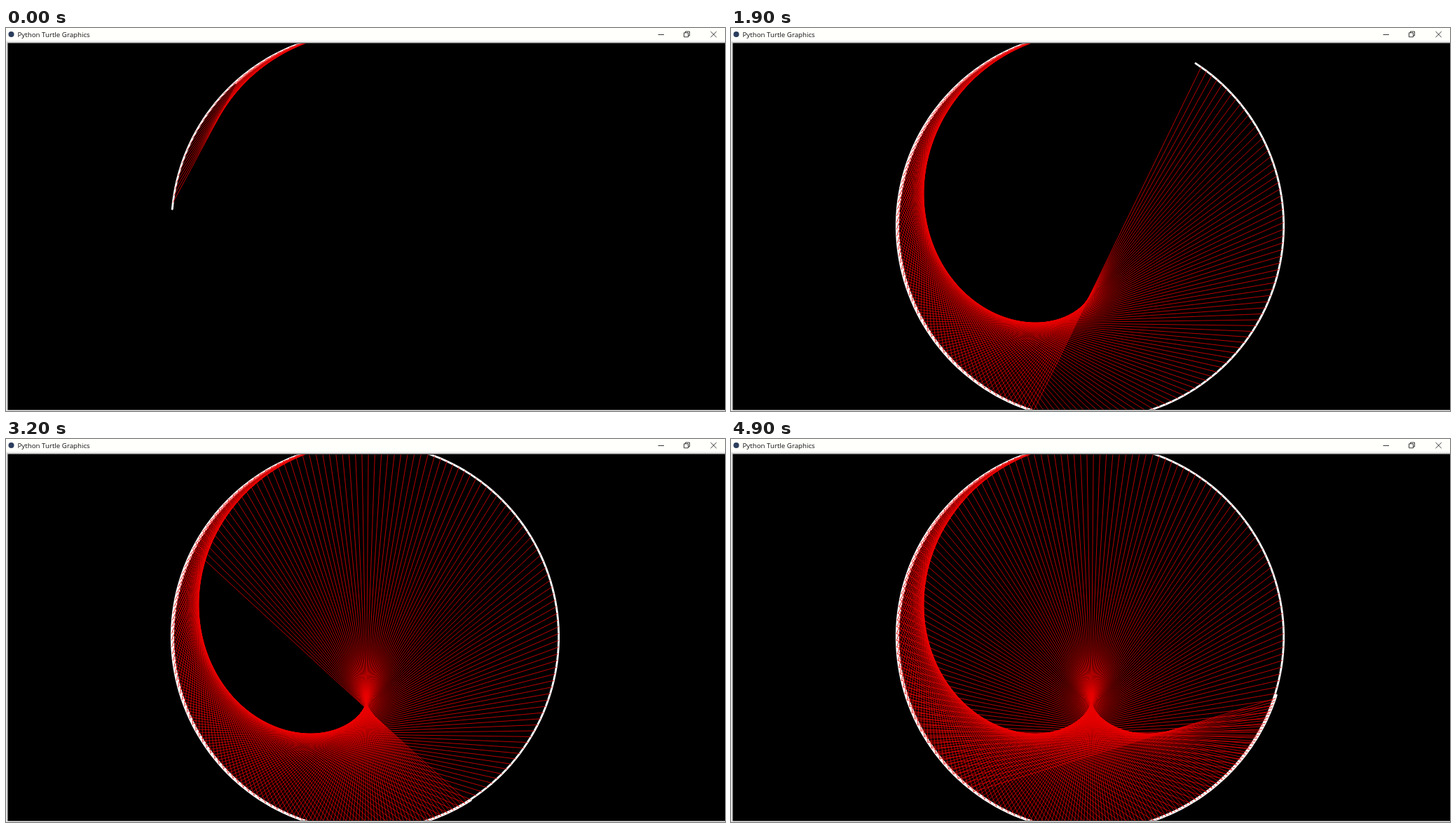
An HTML page with a canvas that plays this animation: 1026x546 px, repeating every 5000 ms.

```html
<!DOCTYPE html>
<html lang="en">
<head>
<meta charset="utf-8">
<title>Turtle cardioid</title>
<style>
html, body { margin: 0; width: 100%; height: 100%; overflow: hidden; background: #fff; }
canvas { display: block; }
</style>
</head>
<body>
<canvas id="stage" width="1026" height="546"></canvas>
<script>
const ctx = document.getElementById('stage').getContext('2d');
const LOOP = 5000, TICK = 100;
const STRIDE = 4.821;
const START = { x: 517.3, y: 5.9 };
const WHITE = { color: '#fff', width: 2.8 };
const RED = { color: '#ea0000', width: 0.8 };

// [time in ms, chords drawn]: drawing slows down as the picture fills
const PACE = [[0, 42], [600, 87], [1300, 131], [2400, 187], [3200, 212], [3900, 231], [4900, 252]];

// Walk forward, then turn left by the same number of degrees each step
function walk(stride, turn, steps) {
  const points = [{ ...START }];
  let { x, y } = START;
  for (let i = 0; i < steps; i++) {
    const heading = i * turn * Math.PI / 180;
    x -= stride * Math.cos(heading);
    y += stride * Math.sin(heading);
    points.push({ x, y });
  }
  return points;
}

const slow = walk(STRIDE, 1, 256);
const fast = walk(STRIDE * 2, 2, 256);

function slope(i) {
  const a = PACE[Math.max(i - 1, 0)], b = PACE[Math.min(i + 1, PACE.length - 1)];
  return (b[1] - a[1]) / (b[0] - a[0]);
}

// Smooth curve through the pace points
function chordsAt(t) {
  let i = 0;
  while (i < PACE.length - 2 && t > PACE[i + 1][0]) i++;
  const [t0, v0] = PACE[i], [t1, v1] = PACE[i + 1];
  const d = t1 - t0, u = (t - t0) / d, w = 1 - u;
  return Math.round(
    v0 * (1 + 2 * u) * w * w + v1 * u * u * (3 - 2 * u) +
    d * u * w * (slope(i) * w - slope(i + 1) * u));
}

function line(a, b, pen) {
  ctx.strokeStyle = pen.color;
  ctx.lineWidth = pen.width;
  ctx.beginPath();
  ctx.moveTo(a.x, a.y);
  ctx.lineTo(b.x, b.y);
  ctx.stroke();
}

function trail(points, steps, pen) {
  ctx.strokeStyle = pen.color;
  ctx.lineWidth = pen.width;
  ctx.beginPath();
  // One lap is enough: later laps cover the same ground
  for (const p of points.slice(0, steps + 1)) ctx.lineTo(p.x, p.y);
  ctx.stroke();
}

function rect(x, y, w, h, color) {
  ctx.fillStyle = color;
  ctx.fillRect(x, y, w, h);
}

function drawWindow() {
  rect(0, 0, 1026, 546, '#fffffb');
  rect(0, 18, 1026, 528, '#f0f0f0');
  rect(1, 20, 1025, 1, '#c8c8c8');
  rect(1, 20, 1, 525, '#c8c8c8');
  rect(2.5, 21.4, 1023.5, 523.2, '#000');

  ctx.fillStyle = '#2b3d5c';
  ctx.beginPath();
  ctx.arc(7.5, 9, 4, 0, Math.PI * 2);
  ctx.fill();

  ctx.fillStyle = '#111';
  ctx.font = '9.74px "Open Sans", "Noto Sans", sans-serif';
  ctx.fillText('Python Turtle Graphics', 16.5, 12.8);

  ctx.strokeStyle = '#222';
  ctx.lineWidth = 0.9;
  ctx.lineCap = 'butt';
  ctx.beginPath();
  ctx.moveTo(930.5, 9.5);
  ctx.lineTo(939, 9.5);
  ctx.rect(967.5, 6.8, 6, 6);
  ctx.moveTo(969.5, 6.8);
  ctx.lineTo(969.5, 5);
  ctx.lineTo(975.5, 5);
  ctx.lineTo(975.5, 11);
  ctx.lineTo(973.5, 11);
  ctx.moveTo(1005.5, 5);
  ctx.lineTo(1013.8, 13.2);
  ctx.moveTo(1013.8, 5);
  ctx.lineTo(1005.5, 13.2);
  ctx.stroke();
}

function drawCurve(chords) {
  ctx.save();
  ctx.beginPath();
  ctx.rect(3, 22.4, 1023, 521.6);
  ctx.clip();
  ctx.lineCap = ctx.lineJoin = 'round';
  trail(fast, Math.min(chords + 1, 180), WHITE);
  trail(slow, chords + 1, WHITE);
  for (let k = 1; k <= chords; k++) line(slow[k], fast[k], RED);
  ctx.restore();
}

let shown = -1;
function frame() {
  const tick = Math.floor(performance.now() % LOOP / TICK);
  if (tick !== shown) {
    shown = tick;
    drawWindow();
    drawCurve(chordsAt(tick * TICK));
  }
  requestAnimationFrame(frame);
}
frame();
</script>
</body>
</html>
```
